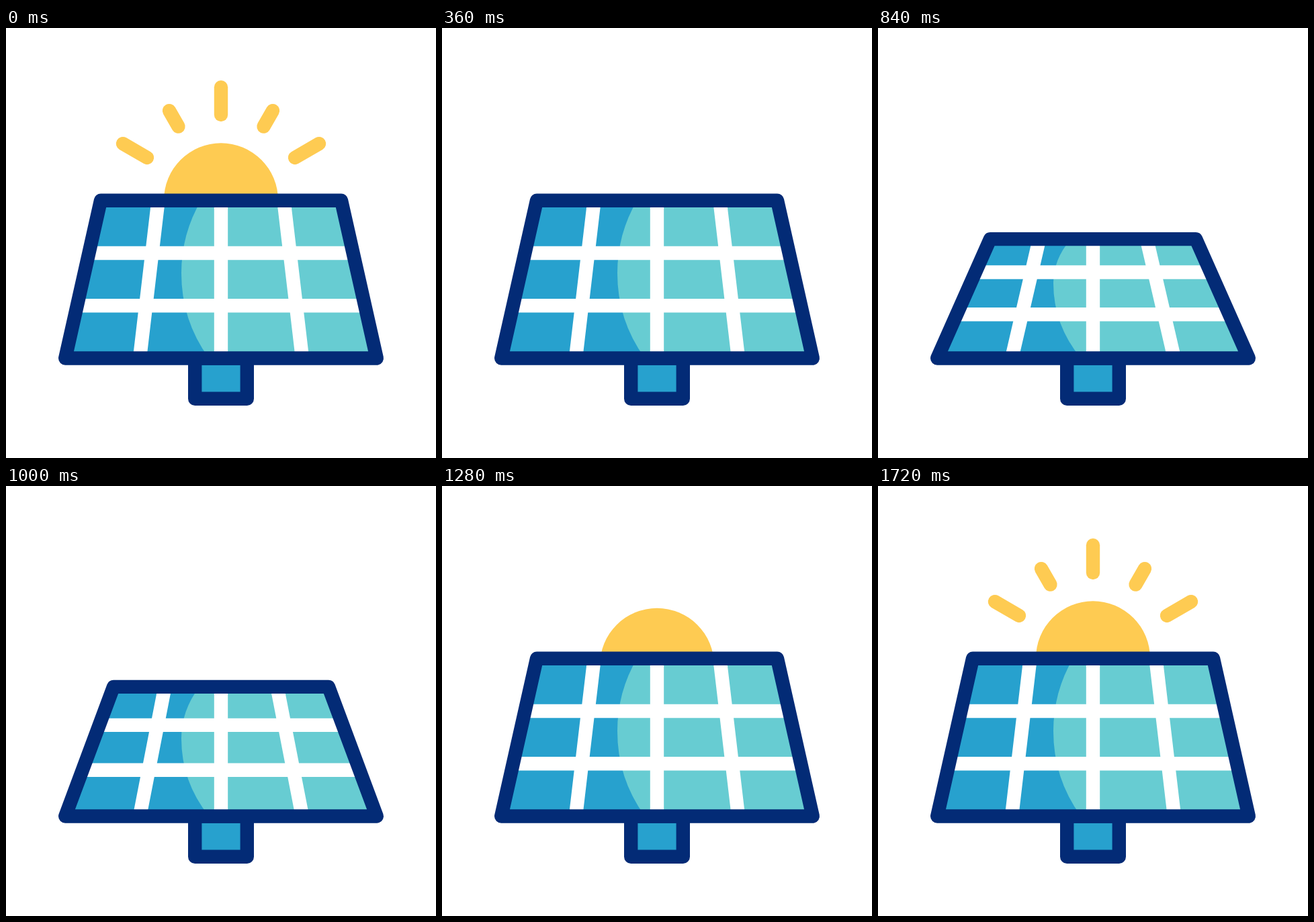
Write an HTML page with a canvas that moves like this. It is 640 px wide and 640 px high and loops after 1760 ms.

```html
<!DOCTYPE html>
<html lang="en">
<head>
<meta charset="utf-8">
<title>Solar panel</title>
<style>
  html, body { margin: 0; height: 100%; overflow: hidden; background: #fff; }
  canvas { display: block; width: 100vw; height: 100vh; }
</style>
</head>
<body>
<canvas id="stage" width="640" height="640"></canvas>
<script>
const ctx = document.getElementById('stage').getContext('2d');
const LOOP = 1760, STEP = 40;
const NAVY = '#032b76', BLUE = '#27a1ce', CYAN = '#67ccd2', YELLOW = '#fecb52';
const MID = 320, BASE = 491.5, BASE_HALF = 231.8, HORIZON = 256.7;

// Panel poses: top y, half width at top, two bar heights,
// then the bright area's top x, bulge y and bulge x.
const REST = [256.7, 179, 335, 413.2, 290.2, 365, 261];
const FOLDED = [338.7, 142, 375.6, 431.8, 285.6, 386, 261];
const RAISED = [248, 191.7, 330.6, 411, 289, 356, 257];

// Outer and inner end of each ray on the left half; the last one is upright.
const RAYS = [[174, 172.2, 210, 193], [243, 123.2, 256.5, 146.6], [320, 88.2, 320, 129]];

const span = (t, a, b) => Math.min(1, Math.max(0, (t - a) / (b - a)));
const easeIn = (u, p) => u ** p;
const easeOut = (u, p) => 1 - (1 - u) ** p;
const mix = (a, b, k) => a.map((v, i) => v + (b[i] - v) * k);

function trace(points, close) {
  ctx.beginPath();
  points.forEach(([x, y]) => ctx.lineTo(x, y));
  if (close) ctx.closePath();
}

function line(color, ...points) {
  trace(points);
  ctx.strokeStyle = color;
  ctx.stroke();
}

function panelPose(t) {
  if (t < 900) return mix(REST, FOLDED, easeIn(span(t, 480, 900), 2.31));
  if (t < 1300) return mix(FOLDED, REST, easeOut(span(t, 900, 1300), 2.31));
  return mix(REST, RAISED, Math.sin(Math.PI * span(t, 1300, 1580)) ** 2);
}

function drawSun(t) {
  const up = t < 720 ? 1 - easeIn(span(t, 160, 360), 2.5) : easeOut(span(t, 1120, 1400), 2.5);
  const grown = t < 720 ? 1 - easeIn(span(t, 40, 280), 2.5) : easeOut(span(t, 1320, 1720), 2.5);

  if (up > 0) {
    ctx.save();
    ctx.beginPath();
    ctx.rect(0, 0, 640, HORIZON);
    ctx.clip();
    ctx.beginPath();
    ctx.arc(MID, 256.3 + 87 * (1 - up), 85, 0, 2 * Math.PI);
    ctx.fillStyle = YELLOW;
    ctx.fill();
    ctx.restore();
  }

  if (grown <= 0) return;
  for (const [x1, y1, x2, y2] of RAYS) {
    const x = x2 + (x1 - x2) * grown, y = y2 + (y1 - y2) * grown;
    line(YELLOW, [x, y], [x2, y2]);
    if (x2 !== MID) line(YELLOW, [640 - x, y], [640 - x2, y2]);
  }
}

function drawStand() {
  ctx.beginPath();
  ctx.rect(281.2, BASE, 77.6, 60.3);
  ctx.fillStyle = BLUE;
  ctx.fill();
  ctx.strokeStyle = NAVY;
  ctx.stroke();
}

function drawPanel([top, half, bar1, bar2, glowX, bulgeY, bulgeX]) {
  const outline = [[MID - half, top], [MID + half, top], [MID + BASE_HALF, BASE], [MID - BASE_HALF, BASE]];

  ctx.save();
  trace(outline, true);
  ctx.fillStyle = BLUE;
  ctx.fill();
  ctx.clip();

  ctx.beginPath();
  ctx.moveTo(glowX, top);
  ctx.quadraticCurveTo(bulgeX, top + (bulgeY - top) * 0.46, bulgeX, bulgeY);
  ctx.quadraticCurveTo(bulgeX, bulgeY + (BASE - bulgeY) * 0.555, 302, BASE);
  ctx.lineTo(640, BASE);
  ctx.lineTo(640, top);
  ctx.fillStyle = CYAN;
  ctx.fill();

  for (const y of [bar1, bar2]) line('#fff', [0, y], [640, y]);
  for (const k of [-0.522, 0, 0.522]) line('#fff', [MID + half * k, top], [MID + BASE_HALF * k, BASE]);
  ctx.restore();

  trace(outline, true);
  ctx.strokeStyle = NAVY;
  ctx.stroke();
}

function frame() {
  const t = Math.floor(performance.now() % LOOP / STEP) * STEP;
  ctx.fillStyle = '#fff';
  ctx.fillRect(0, 0, 640, 640);
  ctx.lineWidth = 20.4;
  ctx.lineCap = ctx.lineJoin = 'round';
  drawSun(t);
  drawStand();
  drawPanel(panelPose(t));
  requestAnimationFrame(frame);
}
frame();
</script>
</body>
</html>
```
